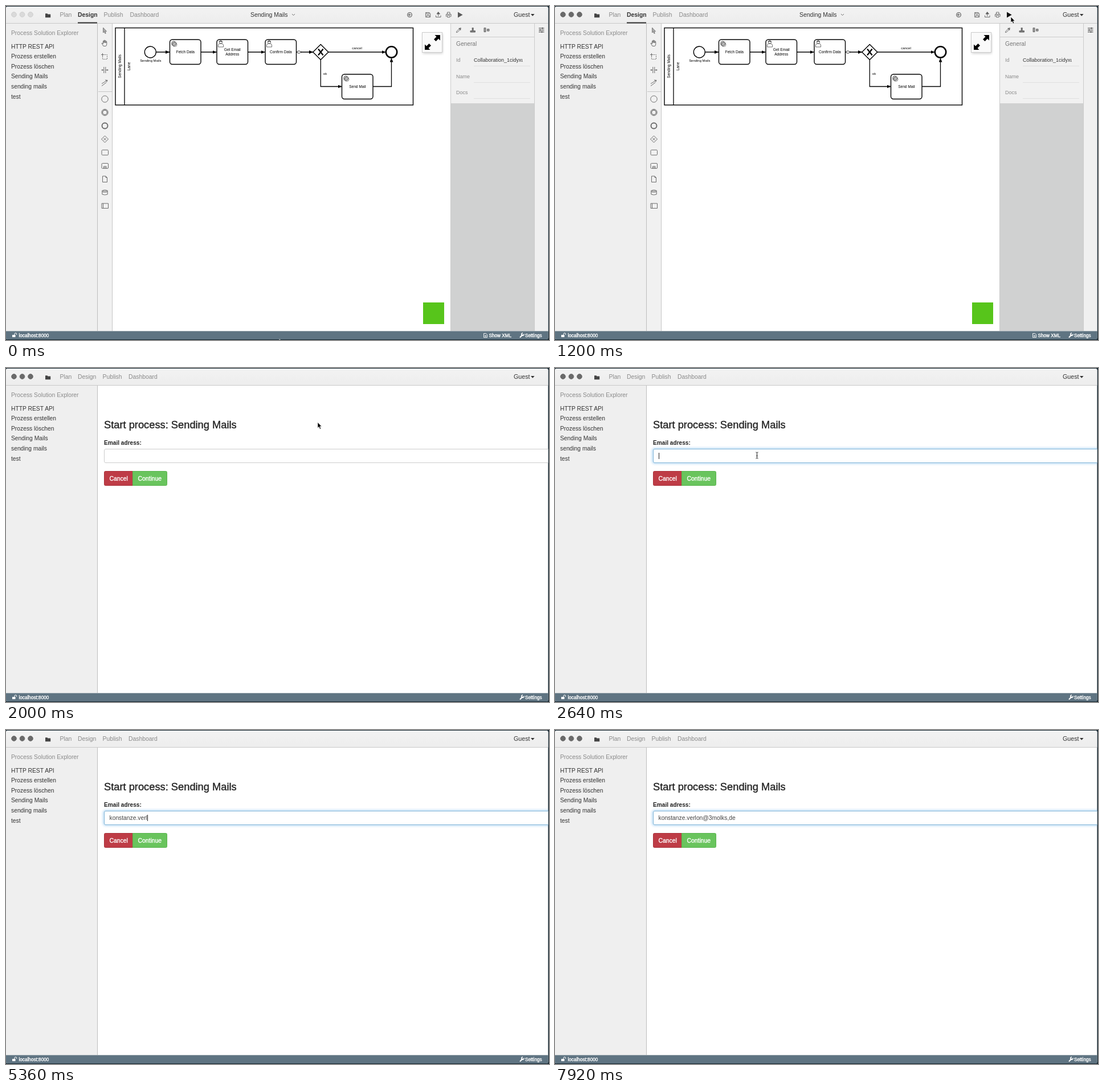
Recreate the animation shown at these times as an HTML page. Size 953 by 587 pixels, loop 8000 ms.

```html
<!DOCTYPE html>
<html lang="en">
<head>
<meta charset="utf-8">
<title>Process designer</title>
<style>
html, body { margin: 0; width: 100%; height: 100%; overflow: hidden; background: #14252f; }
svg { display: block; width: 953px; height: 587px; font-family: "Liberation Sans", Arial, sans-serif; }
text { white-space: pre; }
.line { fill: none; stroke: #000; stroke-width: 1.3; }
.box { fill: #fff; stroke: #000; stroke-width: 1.4; }
.icon { fill: none; stroke: #6c6c6c; stroke-width: 1; }
.tiny { fill: none; stroke: #333; stroke-width: .7; }
.bold { font-weight: bold; }
.medium { stroke: currentColor; stroke-width: .35; }
</style>
</head>
<body>
<svg viewBox="0 0 953 587">
  <defs>
    <linearGradient id="bar" x2="0" y2="1"><stop stop-color="#f3f3f3"/><stop offset="1" stop-color="#ededed"/></linearGradient>
    <filter id="glow" x="-5%" y="-50%" width="110%" height="200%"><feGaussianBlur stdDeviation="2"/></filter>
    <clipPath id="page"><rect y="1" width="951.5" height="585" rx="3"/></clipPath>
    <clipPath id="idBox"><rect x="820" y="85" width="87" height="20"/></clipPath>
    <marker id="tip" viewBox="0 0 7 6" refX="7" refY="3" markerWidth="7" markerHeight="6" markerUnits="userSpaceOnUse" orient="auto"><path d="M0 0L7 3L0 6z"/></marker>
    <g id="gear" class="tiny"><circle r="3.6" stroke-width="1.6" stroke-dasharray="1.4 .8"/><circle r="1.6"/><circle cx="1.6" cy="1.6" r="3.6" stroke-width="1.2" stroke-dasharray="1.2 1"/></g>
    <g id="user" class="tiny"><path d="M-4.5 6v-3q0-2.500 3-3h3q3 .5 3 3v3z"/><circle cy="-2.400" r="2.600"/><path d="M-2.400-3q2-3 4.800 0" stroke-width="1.500"/></g>
  </defs>
  <g clip-path="url(#page)">
    <rect width="953" height="587" fill="#fff"/>
    <rect y="30" width="160" height="542" fill="#efefef"/>
    <path d="M160.500 30V572" stroke="#bdbdbd"/>
    <rect width="953" height="30" fill="url(#bar)"/>
    <path d="M0 30.500H953" stroke="#c9c9c9"/>
    <g id="lights"></g>
    <path d="M69 20.300V13.200h3.500l1 1.300h4.700v5.800z" fill="#444"/>
    <g id="common"></g>
    <path d="M921 14h6.600l-3.300 3.700z" fill="#333"/>

    <g id="design">
      <path d="M126 29.500H160" stroke="#333" stroke-width="2"/>
      <path d="M502 14l2.500 2.500L507 14" class="icon" stroke-width=".8"/>
      <g class="icon" stroke="#555">
        <circle cx="708.500" cy="15.500" r="3.900" stroke-width="1.300"/><path d="M711 15.500h-4.500m2-2l-2 2 2 2" stroke-width="1.200"/>
        <path d="M736.500 11.500h6.500l1.700 1.700v6.300h-8.200zM738.500 11.500v2.700h4v-2.700M738.500 19.500v-3h4.500v3"/>
        <path d="M754.500 16.500v3h8.500v-3M758.700 18v-5"/><path d="M756 14l2.700-3.500 2.800 3.500z" fill="#555"/>
        <path d="M774.500 14v-3h4.500v3M773 18.500h-.500v-4h8.600v4h-.500M774.500 16.500h4.500v3.200h-4.500z"/>
      </g>
      <path id="play" d="M793 10.600L801.600 15.500L793 20.400z"/>
      <rect x="161" y="31" width="26" height="541" fill="#f1f1f1"/>
      <path d="M186.500 31V572M162 150.500H186" stroke="#c6c6c6"/>
      <g class="icon">
        <path d="M170.500 38v9l2-2 1.500 3.500 1.300-.6-1.500-3.300h2.800z" fill="#aaa" stroke-width=".8"/>
        <path d="M171 70.500l-3-5q1-1 2.500 1v-5q1-1 1.500 0v3-4q1-1 1.600 0v4-3.500q1-1 1.600 0v4-2.500q1-1 1.600 0v4q0 3-1.500 4z"/>
        <path d="M169.500 85.500h8v8h-8z" stroke-dasharray="2 1.400"/><path d="M167 85.500h5M169.500 83v5"/>
        <path d="M171.800 107v11M174.800 107v11M168 112.500h3m4 0h4M169.500 111l-1.500 1.500 1.500 1.500m8-3l1.500 1.500-1.500 1.500"/>
        <path d="M168 136.500l10-6m-4-.3l4 .3-1.500 3.300M168 140.500l8-6"/>
        <circle cx="173.500" cy="163.500" r="5.700"/>
        <circle cx="173.500" cy="187" r="5.700"/><circle cx="173.500" cy="187" r="4" stroke-width="1.300"/>
        <circle cx="173.500" cy="210.500" r="5" stroke-width="1.900"/>
        <path d="M173.500 228l6 6-6 6-6-6zM171.500 232l4 4m0-4l-4 4"/>
        <rect x="168" y="253" width="11.500" height="9" rx="1.500"/>
        <rect x="168" y="276.500" width="11.500" height="9" rx="1.500"/><path d="M171.500 285v-3h4.500v3m-3.500-1.200h2.500"/>
        <path d="M169.500 299h5.500l2.500 2.500v8h-8zM175 299v2.500h2.500"/>
        <path d="M168.800 324.500v6.500q4.700 2 9.400 0v-6.500q-4.700-2.500-9.400 0q4.700 2 9.400 0m-9.400 2q4.700 2 9.400 0"/>
        <path d="M168 347h11.500v8.500H168zM170.500 347v8.500"/>
      </g>

      <rect x="192" y="38.500" width="522.500" height="135.500" class="box"/>
      <path d="M208 38.500V174" class="line"/>
      <circle cx="253.300" cy="81" r="10" class="box"/>
      <g class="line" marker-end="url(#tip)" id="flows"></g>
      <g id="tasks"></g>
      <path d="M509.500 81l4.500-2.300 4.500 2.300-4.500 2.300z" fill="#fff" stroke="#000" stroke-width=".8"/>
      <path d="M552.300 67.500L565.800 81L552.300 94.500L538.800 81z" class="box"/>
      <path d="M548 75.500l8.600 11m0-11l-8.600 11" stroke="#000" stroke-width="2.200"/>
      <circle cx="676.500" cy="81" r="9.700" class="box" stroke-width="2.600" style="stroke-width:2.600"/>
      <g id="labels"></g>

      <rect x="731.500" y="48.500" width="35" height="35" fill="#bbb" filter="url(#glow)" opacity=".7"/>
      <rect x="730.500" y="46.500" width="35" height="35" fill="#fafafa" stroke="#ccc"/>
      <path d="M752.500 51h9.500v9.500l-3-3-4.500 4.500-3.500-3.500 4.500-4.500zM735 67.500l3 3 4.500-4.500 3.500 3.500-4.500 4.500 3 3H735z"/>
      <rect x="732" y="521" width="37" height="38" fill="#57c51b"/>

      <rect x="781" y="31" width="146" height="140" fill="#f1f1f1"/>
      <rect x="781" y="171" width="146" height="401" fill="#d0d1d1"/>
      <rect x="927" y="31" width="26" height="541" fill="#f0f0f0"/>
      <path d="M780.500 31V572M927.500 31V572M781 54.500H927" stroke="#cbcbcb"/>
      <path d="M821 105.500H920M821 134.500H920M821 162.500H920" stroke="#e0e0e0"/>
      <g class="icon">
        <path d="M790.500 46.500l.5-2 4.500-4.500 1.500 1.500-4.500 4.500z"/><path d="M795 39l3.200 3.200M796.500 40.500l2-2" stroke-width="1.800"/>
        <path d="M815 43.500h8.500v2.500H815z" fill="#777"/><path d="M819.200 38v5" stroke-width="3"/>
        <path d="M839 38.500h3v7h-3zM844.500 40.500h3.500v3.500h-3.500z" fill="#999"/>
        <path d="M935 39h9.500M935 42.300h9.500M935 45.600h9.500M941.500 37.800v2.500M937.500 41v2.500M940.500 44.300v2.500" stroke="#333"/>
      </g>
      <g id="panel"></g>
    </g>

    <g id="start">
      <g id="heading"></g>
      <g id="form">
        <rect id="halo" x="172" y="142.500" width="790" height="24" rx="3" fill="none" stroke="#66afe9" stroke-width="3" filter="url(#glow)"/>
        <rect id="field" x="172.500" y="142.500" width="790" height="24" rx="2.500" fill="#fff"/>
        <path d="M222.500 181.500H174.500q-2 0-2 2v21q0 2 2 2h48z" fill="#be3c46" stroke="#a9323b"/>
        <path d="M222.500 181.500h58q2 0 2 2v21q0 2-2 2h-58z" fill="#69c45d" stroke="#59b34d"/>
        <g id="formText"></g>
        <text id="typed" x="181.500" y="158" font-size="10.300" fill="#444"></text>
        <path id="caret" d="M.5 149V160" stroke="#222"/>
      </g>
    </g>

    <rect y="571.500" width="953" height="15" fill="#5f7482"/>
    <path d="M0 571.500H953" stroke="#9aa7af"/>
    <path d="M11 578h5.500v4H11zM15 578v-1.500q0-1.800 1.800-1.800t1.800 1.800v1.500" fill="#fff"/>
    <path d="M15 578v-1.500q0-1.800 1.800-1.800t1.800 1.800v1.500" fill="#5f7482" stroke="#fff"/>
    <path d="M902.500 582l4-4" stroke="#fff" stroke-width="1.900" stroke-linecap="round"/>
    <path d="M909 576.500a2.200 2.200 0 1 1-2-1.700" fill="none" stroke="#fff" stroke-width="1.500"/>
    <g id="footer"></g>
    <g id="xml"><path d="M838.500 575.500h4l2 2v5h-6zM840 579h3m-3 1.700h3" fill="none" stroke="#fff" stroke-width=".9"/></g>
  </g>
  <path id="arrow" d="M0 0V10L2.300 8L4 12L5.800 11.200L4.100 7.400H7.200z" stroke="#fff" stroke-width=".7"/>
  <path id="beam" d="M-2-5.500q2 0 2 1.500q0-1.500 2-1.500M0-4V4M-2 5.500q2 0 2-1.500q0 1.500 2 1.500M-1.200.8h2.400" fill="none" stroke="#222"/>
</svg>
<script>
const NS = "http://www.w3.org/2000/svg";
const $ = id => document.getElementById(id);

function add(parent, tag, attrs, content) {
  const el = document.createElementNS(NS, tag);
  for (const k in attrs) el.setAttribute(k, attrs[k]);
  if (content) el.textContent = content;
  return $(parent).appendChild(el);
}
const label = (parent, str, x, y, size, fill = "#333", more = {}) =>
  add(parent, "text", { x, y, "font-size": size, fill, ...more }, str);
const show = (id, on) => { $(id).style.display = on ? "" : "none"; };

// Window chrome
const lights = [14, 28.5, 43].map(cx => add("lights", "circle", { cx, cy: 15, r: 4.4 }));
const tabs = ["Plan", "Design", "Publish", "Dashboard"].map(s => label("common", s, 0, 19, 10.4, "#8a8a8a"));
label("common", "Guest", 891, 19, 10.7);
label("common", "Process Solution Explorer", 9, 51, 10.3, "#8a8a8a");
["HTTP REST API", "Prozess erstellen", "Prozess löschen", "Sending Mails", "sending mails", "test"]
  .forEach((s, i) => label("common", s, 9, 74.5 + i * 17.6, 10.3));
const white = { class: "medium", color: "#fff" };
label("footer", "localhost:8000", 22.5, 582, 8.2, "#fff", white);
label("footer", "Settings", 911, 582, 8.2, "#fff", white);
label("xml", "Show XML", 847.5, 582, 8.2, "#fff", white);

// Designer
label("design", "Sending Mails", 429, 18.5, 10.45);
["M263.500 81H287", "M342 81H369.500", "M424.500 81H454.500", "M509.500 81H539", "M566 81H666.500",
  "M552.300 94.500V141.500H589.500", "M644 141.500H676.500V91.500"]
  .forEach(d => add("flows", "path", { d, "marker-end": "url(#tip)" }));
const mid = { "text-anchor": "middle" };
[[287.5, 59, "gear", "Fetch Data"], [370, 59, "user", "Get Email", "Address"],
  [455, 59, "user", "Confirm Data"], [589.5, 120, "gear", "Send Mail"]]
  .forEach(([x, y, icon, ...rows]) => {
    add("tasks", "rect", { x, y, width: 54.5, height: 43.5, rx: 4.5, class: "box" });
    add("tasks", "use", { href: "#" + icon, x: x + 7, y: y + 7 });
    rows.forEach((s, i) => label("tasks", s, x + 27.3, y + 24 + (i - (rows.length - 1) / 2) * 7.6, 6.6, "#000", mid));
  });
label("labels", "Sending Mails", 253.8, 97.5, 5.95, "#000", mid);
label("labels", "cancel", 616, 76, 6.1, "#000", mid);
label("labels", "ok", 560, 121, 6.1, "#000", mid);
label("labels", "Sending Mails", 0, 0, 6.6, "#000", { ...mid, transform: "translate(201.500 106) rotate(-90)" });
label("labels", "Lane", 0, 0, 6.6, "#000", { ...mid, transform: "translate(218 106) rotate(-90)" });
label("panel", "General", 790, 70, 10.2, "#777");
["Id", "Name", "Docs"].forEach((s, i) => label("panel", s, 790, 98 + i * 28.6, 9, "#8a8a8a"));
label("panel", "Collaboration_1cidyxu", 821, 98, 9, "#333", { "clip-path": "url(#idBox)" });

// Start form
label("heading", "Start process: Sending Mails", 172, 106, 18.3, "#222", { class: "medium", color: "#222" });
label("formText", "Email adress:", 172, 134.5, 10.15, "#222", { class: "bold" });
label("formText", "Cancel", 181.5, 197.5, 10.4, "#fff", white);
label("formText", "Continue", 231.5, 197.5, 10.4, "#fff", white);

const LOOP = 8000, STEP = 80;
const FOCUS = 720, RUN = 1280, FORM = 1600, CLICK = 2480, TYPE = 2960, KEY = 175;
const email = "konstanze.verlon@3molks,de";
const lastKey = TYPE + (email.length - 1) * KEY;

function ease(t, from, to) {
  const p = Math.min(1, Math.max(0, (t - from) / (to - from)));
  return p * p * (3 - 2 * p);
}
const mix = (a, b, p) => a + (b - a) * p;

function pointer(t) {
  const a = ease(t, 0, 480), b = ease(t, 1520, 2400);
  return t < 1520 ? [mix(480, 800, a), mix(585.5, 19, a)] : [mix(800, 354.5, b), mix(19, 153.5, b)];
}

function draw(t) {
  const designing = t < RUN, active = t >= FOCUS, focused = t >= CLICK;
  show("design", designing);
  show("xml", designing);
  show("start", !designing);
  show("form", t >= FORM);
  lights.forEach(c => {
    c.setAttribute("fill", active ? "#6a6a6a" : "#dadada");
    c.setAttribute("stroke", active ? "#5e5e5e" : "#c6c6c6");
    c.setAttribute("stroke-width", .7);
  });
  $("play").setAttribute("fill", active ? "#111" : "#5a5a5a");
  const xs = designing ? [94.5, 126, 171.5, 217.5] : [94.5, 126, 169.5, 215];
  tabs.forEach((tab, i) => {
    const on = designing && i === 1;
    tab.setAttribute("x", xs[i]);
    tab.setAttribute("fill", on ? "#333" : "#8a8a8a");
    tab.setAttribute("font-weight", on ? "bold" : "normal");
  });

  $("halo").setAttribute("opacity", .6 * ease(t, CLICK - STEP, CLICK + STEP));
  $("field").setAttribute("stroke", focused ? "#7fb4d6" : "#ccc");
  const count = t < TYPE ? 0 : Math.min(email.length, Math.floor((t - TYPE) / KEY) + 1);
  $("typed").textContent = email.slice(0, count);
  const since = t - (t < TYPE ? CLICK : lastKey);
  const blinkOn = (t >= TYPE && t < lastKey) || since % 1000 < 500;
  show("caret", focused && blinkOn);
  const end = count ? $("typed").getComputedTextLength() : 0;
  $("caret").setAttribute("transform", `translate(${Math.round(181.5 + end)} 0)`);

  const [x, y] = pointer(t);
  const overField = t >= FORM && y > 142;
  for (const id of ["arrow", "beam"]) {
    show(id, t < TYPE && (id === "beam") === overField);
    $(id).setAttribute("transform", `translate(${x} ${y})`);
  }
}

function tick() {
  const t = performance.now() % LOOP;
  draw(Math.floor(t / STEP) * STEP);
  requestAnimationFrame(tick);
}
tick();
</script>
</body>
</html>
```
